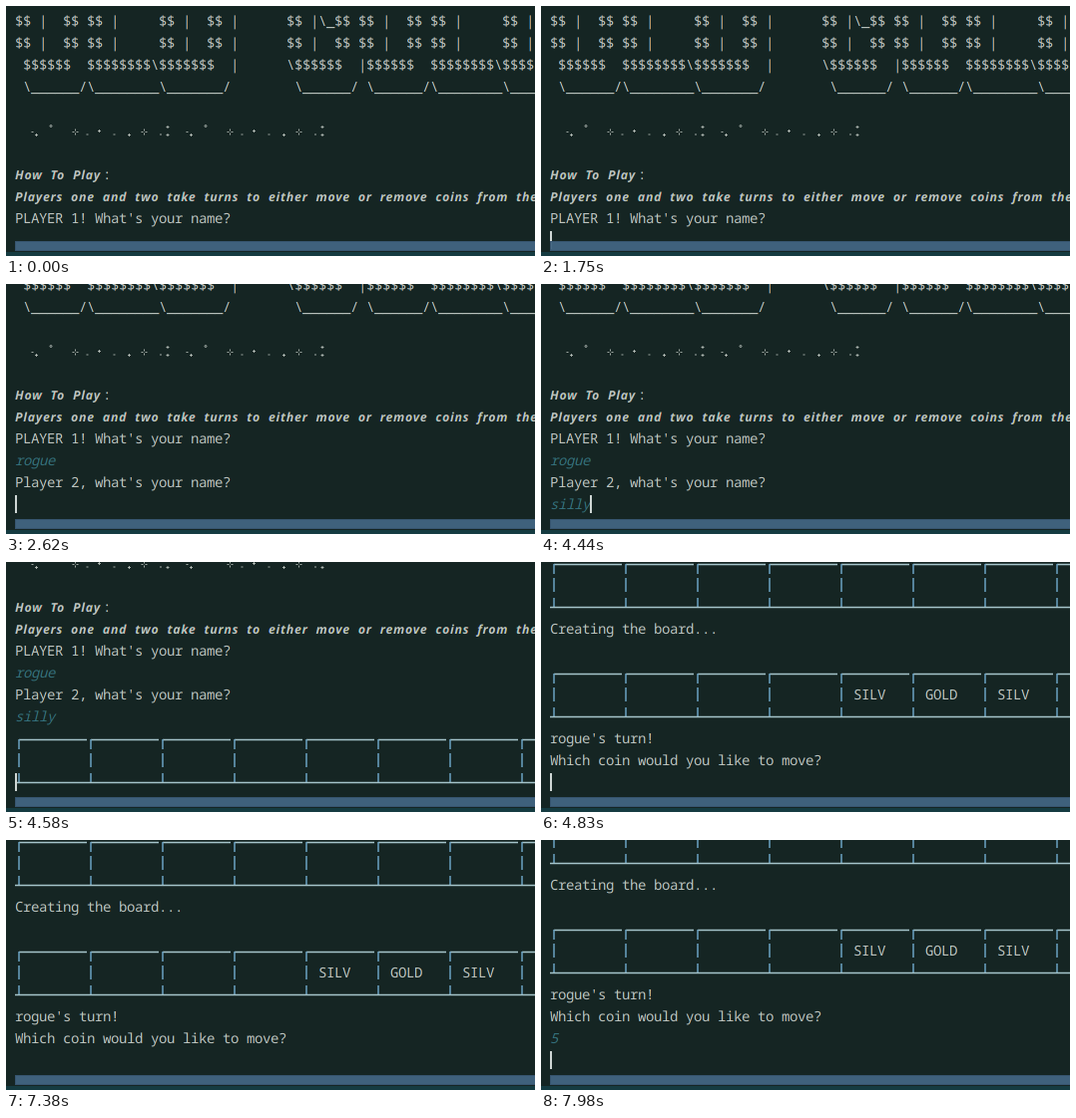
Write an HTML page that moves like this. It is 530 by 251 pixels and loops after 8 s.

```html
<!DOCTYPE html>
<html lang="en">
<head>
<meta charset="utf-8">
<title>Coin game terminal</title>
<style>
  html, body { margin: 0; width: 530px; height: 251px; overflow: hidden; background: #152523; }
  svg { display: block; }
  text {
    font: 14px "Noto Sans Mono", "DejaVu Sans Mono", monospace; letter-spacing: -.4px;
    white-space: pre; text-rendering: geometricPrecision; mix-blend-mode: lighten;
  }
  .rule text {
    font: italic bold 12.4px "Noto Sans", "Open Sans", sans-serif;
    letter-spacing: .72px; word-spacing: 4.05px;
  }
  .input text { font-style: italic; }
  path { fill: none; }
  .spark { stroke: #b9c1bb; stroke-opacity: .85; }
  .wall { stroke: #6ba3c4; stroke-width: 1.5; }
  .edge { stroke: #a5c4ca; stroke-width: 1.3; }
</style>
</head>
<body>
<svg width="530" height="251" viewBox="0 0 530 251">
  <g id="page">
    <rect width="530" height="700" fill="#152523"/>
    <rect id="caret" width="2" height="18" fill="#ced6d4"/>
  </g>
  <rect x="9.5" y="236.5" width="530" height="9" fill="#426582" fill-opacity=".94" stroke="#375570"/>
  <rect y="247" width="530" height="4" fill="#153b41"/>
</svg>
<script>
const LEFT = 9, CELL = 8, ROW = 22, LOOP = 8000;
const KEY = 146, LINE = 33, BLINK = 512, FIRST_BLINK = 720;
const PLAIN = [190, 197, 192], TYPED = [52, 112, 123];
const page = document.getElementById("page");
const caret = document.getElementById("caret");
const rows = [];
const middle = row => 15 + ROW * row;

function make(tag, attrs, parent, before = null) {
  const el = document.createElementNS("http://www.w3.org/2000/svg", tag);
  for (const key in attrs) el.setAttribute(key, attrs[key]);
  return parent.insertBefore(el, before);
}

function add(row, tag, attrs) {
  const el = make(tag, attrs, page, caret);
  rows.push({ row, el });
  return el;
}

// One copy per colour channel, a third of a pixel apart, like LCD text.
function print(row, content, cls = "", col = 0, color = PLAIN) {
  const group = add(row, "g", { class: cls });
  color.forEach((value, i) => {
    const rgb = [0, 0, 0];
    rgb[i] = value;
    make("text", { x: LEFT + CELL * col + (1 - i) / 3, y: middle(row) + 5, fill: `rgb(${rgb})` }, group)
      .textContent = content;
  });
  return group;
}

const draw = (row, d, cls) => add(row, "path", { d, class: cls });

function sparkles(row) {
  const y = middle(row);
  const plus = (x, dy) => `M${x - 1.5} ${y + dy}h3M${x} ${y + dy - 1.5}v3`;
  const shapes = {
    "+": x => plus(x, 4.5),
    "*": x => plus(x, 0.5),
    ":": x => plus(x, -3.5) + plus(x, 4.5),
    "'": x => `M${x - 1} ${y + 1.5}h2`,
    ".": x => `M${x - 1} ${y + 4}h2`,
    "o": x => `M${x - 1} ${y - 4.5}a1 1 0 1 0 2 0a1 1 0 1 0 -2 0`,
    "x": x => `M${x - 3} ${y + 1.5}h2m2 0h2M${x} ${y - 1.5}v2m0 2v2`
  };
  const places = [26.5, 30.5, 45, 69.5, 81.5, 93.5, 108.5, 123.5, 138.5, 155, 162];
  for (const shift of [0, 155])
    [..."'+ox.*.+x.:"].forEach((kind, i) => draw(row, shapes[kind](places[i] + shift), "spark"));
}

function board(row, coins) {
  const [top, mid, low] = [0, 1, 2].map(i => middle(row + i));
  for (let x = LEFT + 4; x < 530; x += 9 * CELL) {
    draw(row, `M${x} ${top + 1.5}h68`, "edge");
    draw(row, `M${x} ${top + 1}v10`, "wall");
    draw(row + 1, `M${x} ${mid - 7}v14`, "wall");
    draw(row + 2, `M${x} ${low - 9}v10`, "wall");
  }
  draw(row + 2, `M${LEFT} ${low + 0.5}H530`, "edge");
  coins.forEach((coin, i) => print(row + 1, coin, "", 9 * (i + 4) + 2));
}

const wide = "$$ |  $$ $$ |     $$ |  $$ |      $$ |";
const tail = "$$ $$ |  $$ $$ |     $$ |";
print(0, wide + "\\_" + tail);
print(1, wide + "  " + tail);
print(2, " $$$$$$  $$$$$$$$\\$$$$$$$  |      \\$$$$$$  |$$$$$$  $$$$$$$$\\$$$$$$$  |");
print(3, " \\______/\\________\\_______/        \\______/ \\______/\\________\\_______/");
sparkles(5);
print(7, "How To Play", "rule");
print(7, ":", "", 11);
print(8, "Players one and two take turns to either move or remove coins from the left", "rule");
print(9, "PLAYER 1! What's your name?");
print(11, "Player 2, what's your name?");
board(13, []);
print(16, "Creating the board...");
board(18, ["SILV", "GOLD", "SILV"]);
print(21, "rogue's turn!");
print(22, "Which coin would you like to move?");

// Each answer is typed at an even pace, then lines print down to row "next".
const answers = [
  { row: 10, next: 12, word: "rogue", start: 1855 },
  { row: 12, next: 23, word: "silly", start: 3765 },
  { row: 23, next: 24, word: "5", start: 7800 }
];
for (const a of answers) a.group = print(a.row, "", "input", 0, TYPED);

function show(t) {
  let row = answers[0].row, typed = 0, lastKey = -LOOP;
  for (const { word, start, next, row: from, group } of answers) {
    const keys = Math.max(0, Math.min(word.length + 1, Math.floor((t - start) / KEY) + 1));
    for (const text of group.children) text.textContent = word.slice(0, keys);
    if (!keys) continue;
    lastKey = start + KEY * (keys - 1);
    const entered = keys > word.length;
    typed = entered ? 0 : keys;
    row = entered ? Math.min(next, from + 1 + Math.floor((t - lastKey) / LINE)) : from;
  }
  // The view follows the caret only once the first key is pressed.
  const scroll = t < answers[0].start ? 0 : middle(row) - 221;
  page.setAttribute("transform", `translate(0 ${-scroll})`);
  for (const r of rows) r.el.style.display = r.row <= row ? "" : "none";

  const blink = t >= FIRST_BLINK && Math.floor((t - FIRST_BLINK) / BLINK) % 2 === 0;
  caret.setAttribute("x", LEFT + CELL * typed);
  caret.setAttribute("y", middle(row) - 9);
  caret.style.display = blink || t - lastKey < 300 ? "" : "none";
}

const start = performance.now();
function tick() {
  show((performance.now() - start) % LOOP);
  requestAnimationFrame(tick);
}
tick();
</script>
</body>
</html>
```
